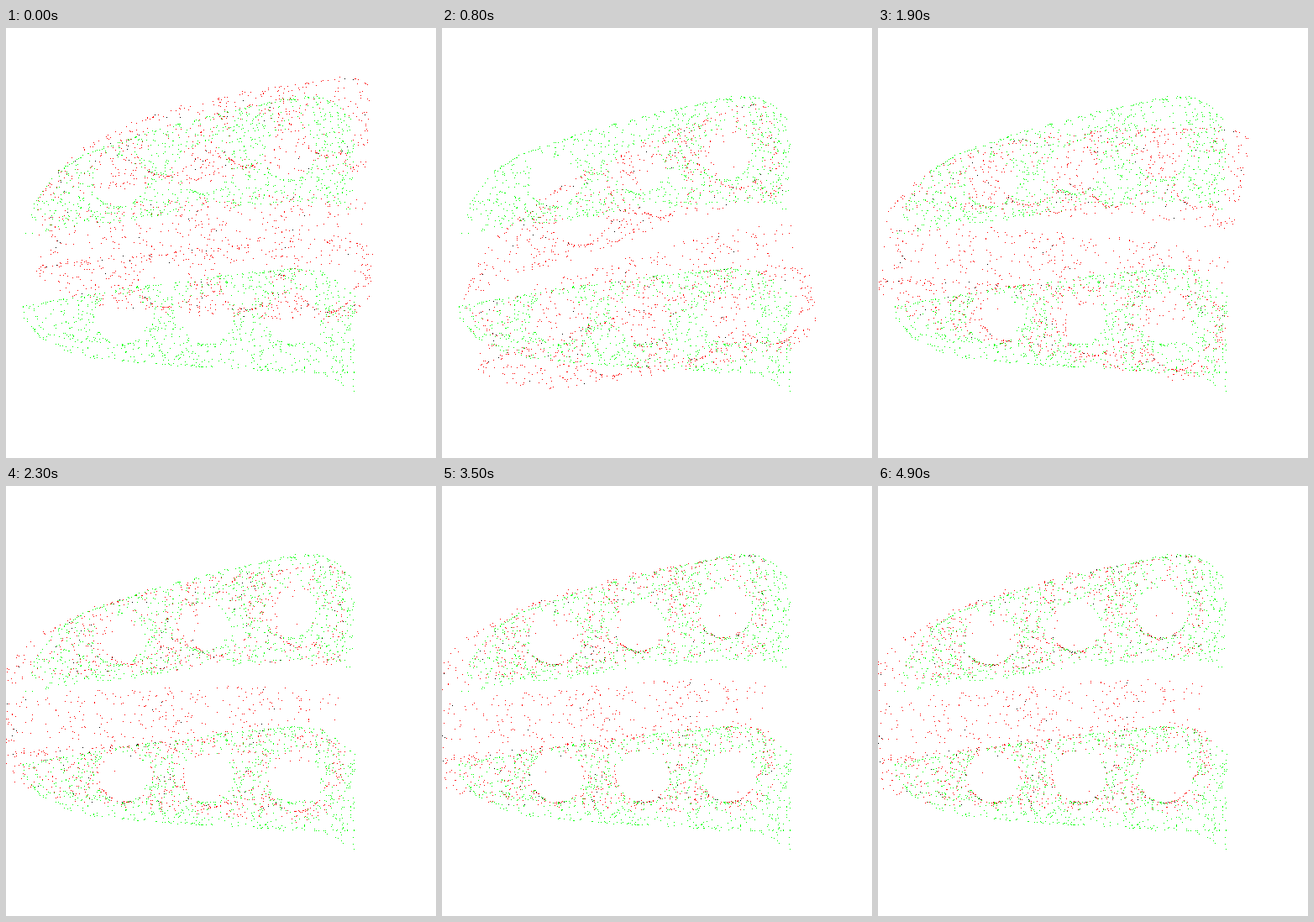
These frames come from a looping animation (512 by 512 pixels, 5000 ms). A matplotlib script:

```python
import numpy as np
import matplotlib.pyplot as plt
from matplotlib.animation import FuncAnimation

SIZE, FRAMES, INTERVAL = 512, 50, 100
rng = np.random.default_rng(11)

# Openings: centre and radii, evenly spaced along each side
UPPER_HOLES = [(133 + 102 * i, 183 - 16 * i, 30, 29) for i in range(3)]
LOWER_HOLES = [(137 + 102 * i, 346, 31, 30) for i in range(3)]


def curve(start, apex, base, rise, hook=0.0, tip=0, fade=25):
    """Edge line: a slope down to base at apex, a hook after it, a nose tip."""
    def y(x):
        slope = np.clip((apex - x) / (apex - start), 0, None) ** 1.35
        tail = np.clip(x - apex, 0, None) ** 2
        return base + rise * slope + hook * tail + tip * np.exp((start - x) / fade)
    return y


def pillars(x):
    """Dots gather between the openings and at the right end."""
    return 0.5 + 0.4 * np.cos(np.pi * (x - 185) / 102) ** 2 + 0.4 * (x > 380)


def panel(n, x0, x1, top, bottom, holes=(), leak=0.0):
    """Fill the strip between two edges evenly, leaving the holes open."""
    x = rng.uniform(x0, x1, 40 * n)
    y = rng.uniform(60, 440, x.size)
    keep = (y > top(x)) & (y < bottom(x)) & (rng.random(x.size) < pillars(x))
    for cx, cy, rx, ry in holes:
        outside = ((x - cx) / rx) ** 2 + ((y - cy) / ry) ** 2 > 1
        keep &= outside | (rng.random(x.size) < leak)
    return np.c_[x, y][keep][:n]


def outline(n, x0, x1, edge, jitter=0.8):
    x = rng.uniform(x0, x1, n)
    return np.c_[x, edge(x) + rng.normal(0, jitter, n)]


def arc(hole, n):
    """Scatter dots along the lower rim of an opening."""
    cx, cy, rx, ry = hole
    t = np.radians(rng.normal(95, 32, n))
    r = 1 + np.abs(rng.normal(0, 0.05, n))
    return np.c_[cx + rx * r * np.cos(t), cy + ry * r * np.sin(t)]


def fixed_cloud():
    upper_top = curve(22, 365, 82, 90, 0.013, 67)
    upper_bottom = curve(22, 365, 205, 40, 0.006)
    lower_top = curve(14, 350, 287, 45, 0.007)
    lower_bottom = curve(14, 350, 408, -22, 0.006, -55, 28)
    parts = [
        panel(790, 22, 414, upper_top, upper_bottom, UPPER_HOLES),
        outline(110, 24, 413, upper_top),
        outline(35, 22, 414, upper_bottom),
        panel(790, 14, 415, lower_top, lower_bottom, LOWER_HOLES),
        outline(85, 16, 410, lower_top),
        outline(70, 20, 411, lower_bottom),
    ]
    parts += [arc(h, 20) for h in UPPER_HOLES + LOWER_HOLES]
    return np.vstack(parts)


def moving_cloud():
    left, right = -25, 386
    upper_top = curve(left, 365, 83, 97, 0.02, 70, 45)
    upper_bottom = curve(left, 365, 202, 45)
    middle_top = curve(left, 350, 227, 32, 0.006)
    middle_bottom = curve(left, 350, 284, 36)
    lower_top = curve(left, 350, 287, 45, 0.005)
    lower_bottom = curve(left, 350, 386, -4, -0.015, -45, 45)
    parts = [
        panel(500, left, right, upper_top, upper_bottom, UPPER_HOLES, 0.1),
        outline(70, left, right, upper_top, 1.2),
        panel(300, left, right, middle_top, middle_bottom),
        panel(430, left, 396, lower_top, lower_bottom, LOWER_HOLES, 0.08),
        outline(90, left, 392, lower_top, 2.2),
        outline(30, left, 396, lower_bottom, 1.2),
    ]
    parts += [arc(h, 22) for h in UPPER_HOLES + LOWER_HOLES]
    return np.vstack(parts)


# The search swings around the answer, then settles: frame, turn, shift x, y
CENTRE = np.array([190, 240])
POSES = np.array([
    (0, 0.03, 52, -37),
    (2, 0, 45, -70),
    (4, -0.12, 80, 87),
    (6, -0.05, 80, -53),
    (8, -0.195, 40, 33),
    (13, 0.05, 70, 30),
    (19, 0.17, 34, 6),
    (25, 0, 0, 0),
])


def align(dots, frame):
    turn, dx, dy = (np.interp(frame, POSES[:, 0], col) for col in POSES.T[1:])
    scale = 0.95 + 0.05 * min(frame / 20, 1)
    c, s = scale * np.cos(turn), scale * np.sin(turn)
    wobble = 0.6 * np.array([np.sin(2.1 * frame), np.cos(1.7 * frame)])
    return (dots - CENTRE) @ [[c, s], [-s, c]] + CENTRE + (dx, dy) + wobble


def stamp(image, dots, channels):
    """Clear colour channels under each dot; overlaps turn black."""
    x, y = np.rint(dots).astype(int).T
    ok = (x >= 0) & (x < SIZE) & (y >= 0) & (y < SIZE)
    for c in channels:
        image[y[ok], x[ok], c] = 0


fixed, moving = fixed_cloud(), moving_cloud()
background = np.full((SIZE, SIZE, 3), 255, np.uint8)
stamp(background, fixed, (0, 2))

fig = plt.figure(figsize=(5.12, 5.12), dpi=100, facecolor="white")
ax = fig.add_axes([0, 0, 1, 1])
ax.axis("off")
picture = ax.imshow(background, interpolation="nearest", aspect="auto")


def update(frame):
    image = background.copy()
    dots = align(moving, frame)
    stamp(image, dots, (1, 2))
    stamp(image, dots[::25], (0,))
    picture.set_data(image)
    return [picture]


anim = FuncAnimation(fig, update, frames=FRAMES, interval=INTERVAL,
                     repeat=True, repeat_delay=0, blit=False)
plt.show()
```
